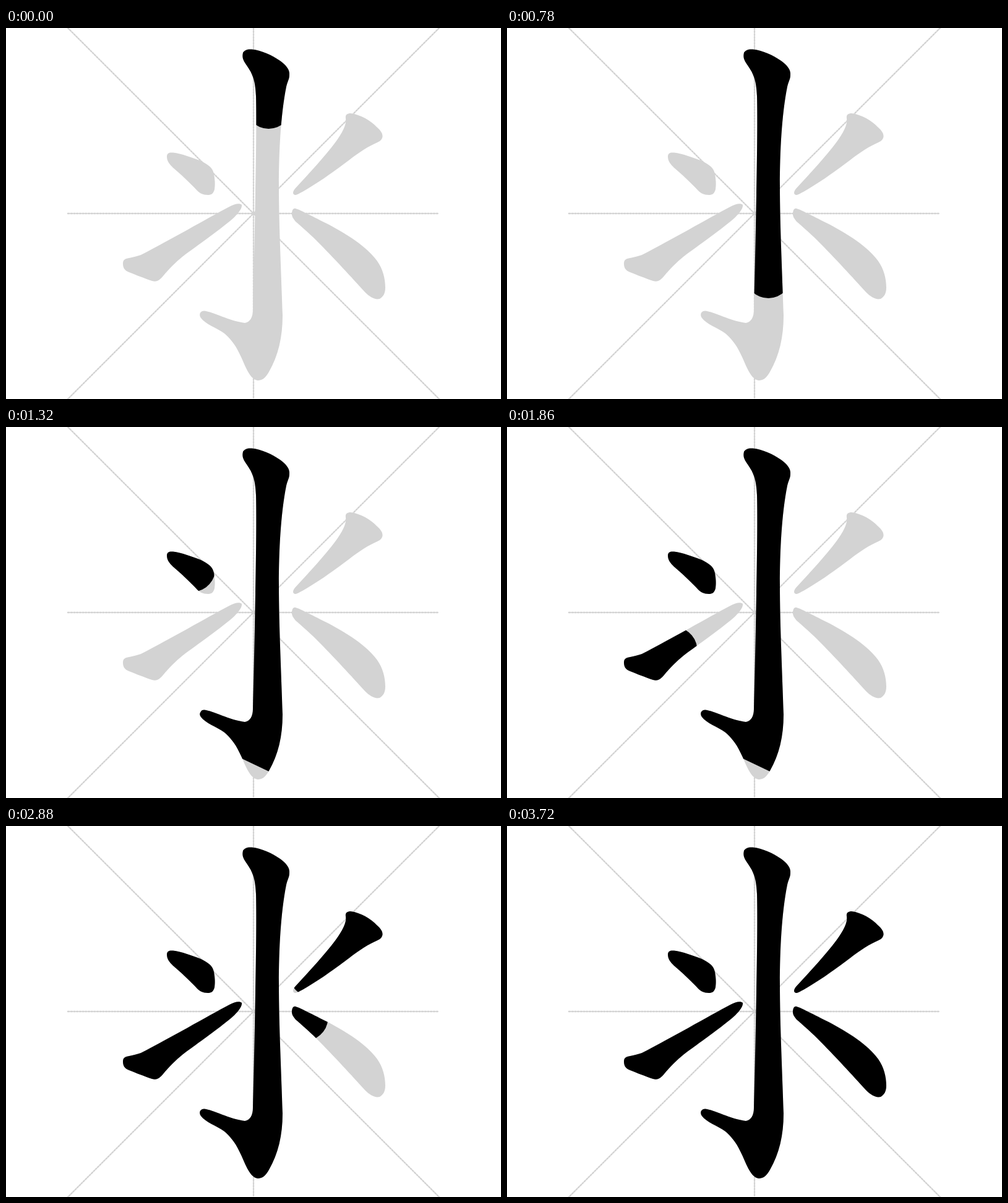
Animation of 800 by 600 pixels, one loop 3780 ms. Source, as an HTML page with a canvas:

```html
<!DOCTYPE html>
<html lang="en">
<head>
<meta charset="utf-8">
<title>Stroke order</title>
<style>
  html, body { margin: 0; width: 100%; height: 100%; overflow: hidden; background: #fff; }
  canvas { display: block; }
</style>
</head>
<body>
<canvas width="800" height="600"></canvas>
<script>
const ctx = document.querySelector('canvas').getContext('2d');
const LOOP = 3780, STEP = 60, BRUSH = 75, GUIDE = 600 / 256;

// shape: outline; brush: [ms, x, y] along the pen's way; full: when the whole outline is inked
const strokes = [
  {
    shape: `M383 40C385 36 390 34 397 34.5C413 36 430 44 443 53C453 60 459 68 458 76C458 83 455 86 453 95
      C444 140 441 200 441 255C441 320 445 400 447 465C447 500 440 530 425 556C419 567 413 570 407 570
      C401 569 396 565 390 554C385 545 382 535 377 526C370 511 362 502 353 494C341 485 322 479 315 469
      C311 463 314 457 321 457.5C334 459 362 474 386 477C394 476 399 468 399 456C401 380 402 330 403 270
      C404 220 405 150 404 110C403 88 400 80 395 70C388 57 380 52 383 40Z`,
    brush: [[-260, 398, 52], [-140, 425, 78], [0, 424.5, 125.5], [540, 422, 318.5], [780, 422.5, 399.5],
      [1080, 430, 518], [1330, 344, 477]],
    full: 2040
  },
  {
    shape: `M260 208C260 202 264 201 270 201.5C283 203 302 210 315 215C327 221 334 226 336 236
      C338 247 338 254 337 261C335 268 332 270 326 270C318 270 313 267 309 263C298 251 281 235 270 226
      C264 220 260 215 260 208Z`,
    brush: [[1060, 269, 210], [1080, 271, 211], [1320, 301, 229], [1500, 322, 250]],
    full: 1620
  },
  {
    shape: `M189 381C189 375 192 373 199 372C207 370 213 369 218 367C265 343 325 308 361 289
      C370 284 378 283 381 286C382 291 376 299 369 306C348 325 310 351 285 370C275 378 264 389 254 401
      C247 409 243 411 236 409C224 405 209 399 199 395C191 392 189 387 189 381Z`,
    brush: [[1540, 202, 383], [1620, 218, 380], [1720, 240, 377], [1860, 270, 361], [2220, 329, 319],
      [2400, 362, 295]],
    full: 2640
  },
  {
    shape: `M549 146C548 140 552 138 557 138C573 140 590 150 599 160C606 166 609 171 608.5 176
      C607 183 602 184 596 187C580 194 563 207 550 217C525 236 500 253 479 265C473 268 470 270 467 270
      C463 269 463 265 467 260C490 235 515 208 533 184C543 170 551 156 549 146Z`,
    brush: [[2210, 562, 152], [2220, 563, 153], [2310, 574, 170], [2700, 519, 215], [2880, 495, 239],
      [3060, 472, 264]],
    full: 3180
  },
  {
    shape: `M462 301C462 295 464 291 468 292C475 294 486 300 520 317C550 333 583 353 600 377
      C609 390 613 405 613 420C613 430 609 435 604 438C596 440 588 435 580 427C560 405 530 372 501 343
      C490 332 476 320 468 313C464 308 462 305 462 301Z`,
    brush: [[2790, 470, 300], [2880, 483, 310], [3240, 538, 353], [3560, 585, 405]],
    full: 3720
  }
].map(s => ({ ...s, shape: new Path2D(s.shape) }));

function guide(x1, y1, x2, y2) {
  ctx.beginPath();
  ctx.moveTo(x1, y1);
  ctx.lineTo(x2, y2);
  ctx.stroke();
}

function drawGuides() {
  ctx.save();
  ctx.strokeStyle = 'lightgray';
  ctx.lineWidth = GUIDE;
  ctx.setLineDash([GUIDE, GUIDE]);
  guide(100, 0, 700, 600);
  guide(700, 0, 100, 600);
  guide(400, 0, 400, 600);
  guide(100, 300, 700, 300);
  ctx.restore();
}

function brushPath(points, time) {
  const path = new Path2D();
  path.moveTo(points[0][1], points[0][2]);
  for (let i = 1; i < points.length; i++) {
    const [t0, x0, y0] = points[i - 1], [t1, x1, y1] = points[i];
    if (time <= t0) break;
    const k = Math.min(1, (time - t0) / (t1 - t0));
    path.lineTo(x0 + (x1 - x0) * k, y0 + (y1 - y0) * k);
  }
  return path;
}

function ink({ shape, brush, full }, time) {
  if (time >= full) return ctx.fill(shape);
  if (time <= brush[0][0]) return;
  ctx.save();
  ctx.clip(shape);
  ctx.stroke(brushPath(brush, time));
  ctx.restore();
}

function draw(time) {
  ctx.fillStyle = '#fff';
  ctx.fillRect(0, 0, 800, 600);
  drawGuides();
  ctx.fillStyle = 'lightgray';
  strokes.forEach(s => ctx.fill(s.shape));
  ctx.fillStyle = ctx.strokeStyle = '#000';
  ctx.lineWidth = BRUSH;
  ctx.lineCap = 'round';
  ctx.miterLimit = 4;
  strokes.forEach(s => ink(s, time));
}

const start = performance.now();
function tick() {
  const time = (performance.now() - start) % LOOP;
  draw(Math.floor(time / STEP) * STEP);
  requestAnimationFrame(tick);
}
tick();
</script>
</body>
</html>
```
